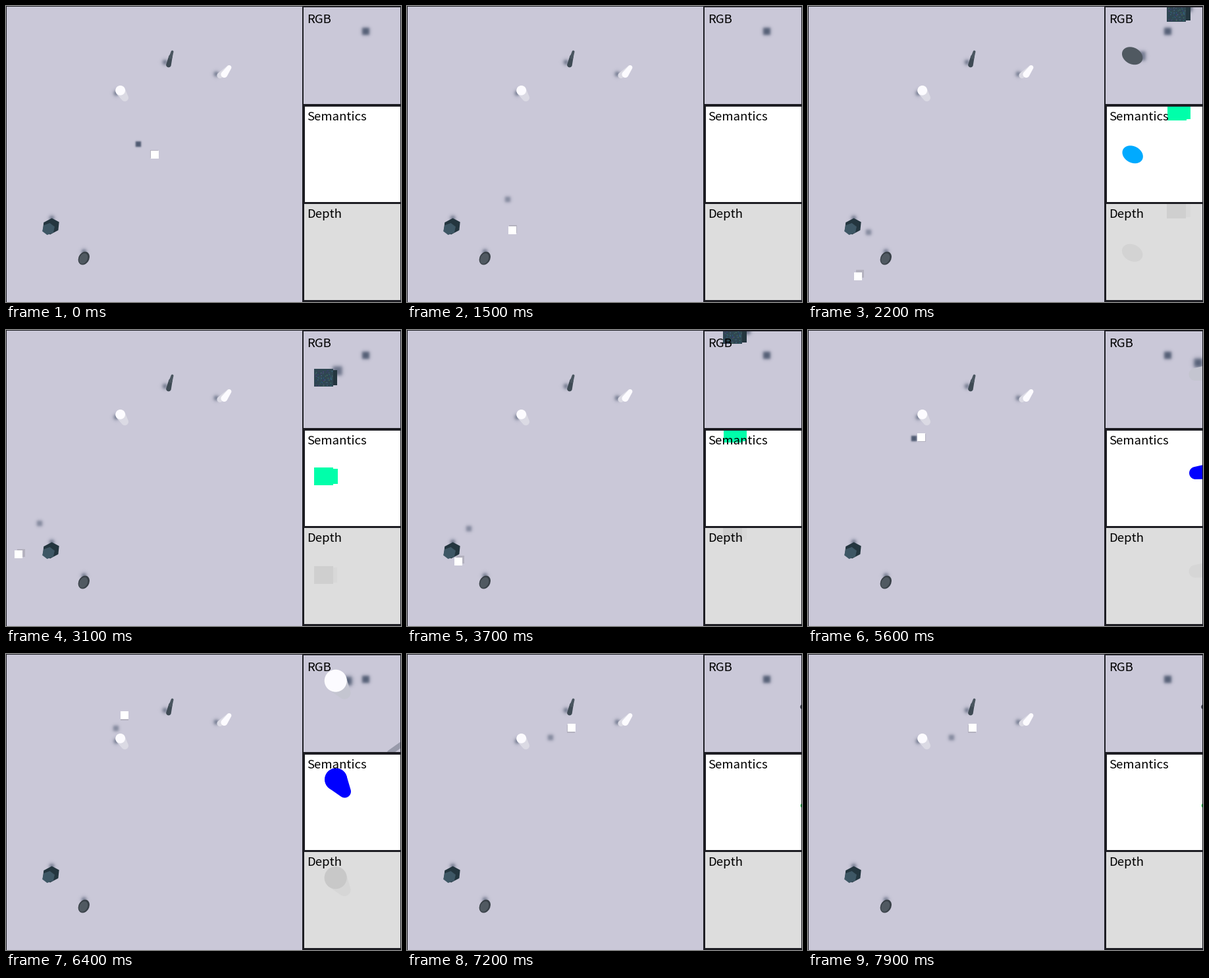
These frames come from a looping animation (600 by 450 pixels, 8000 ms). A matplotlib script:

```python
import numpy as np
import matplotlib.pyplot as plt
from matplotlib.animation import FuncAnimation
from matplotlib.patches import Circle, Ellipse, Polygon, Rectangle

W, H, DPI = 600, 450, 100
FRAMES, INTERVAL, HOLD = 80, 100, 8

# The drone jumps to the next waypoint after every HOLD frames
WAYPOINTS = [(225.5, 225.5), (160, 341), (76, 411), (19, 341), (78, 352),
             (85.5, 305), (128, 238), (171.5, 163), (179.5, 92.5),
             (249.5, 111.5)]
MID = 225            # map centre, below the overhead camera
GROUND = .725        # ground scale relative to the drone's flying height
ZOOM = 1.45          # drone camera scale
VIEW = np.array([525.5, 75])


def rgb(*c):
    return tuple(v / 255 for v in c)


def gray(v):
    return rgb(v, v, v)


FLOOR, FRAME, SHADE = rgb(202, 200, 216), rgb(29, 29, 35), rgb(72, 84, 108)
TEAL, TEAL_DARK = rgb(62, 87, 101), rgb(36, 54, 63)
SLATE, SLATE_DARK = rgb(80, 89, 97), rgb(56, 64, 71)
PALE, WHITE = rgb(219, 218, 228), rgb(252, 251, 255)

fig = plt.figure(figsize=(W / DPI, H / DPI), dpi=DPI, facecolor=FRAME)
ax = fig.add_axes([0, 0, 1, 1])
ax.set_xlim(0, W)
ax.set_ylim(H, 0)
ax.axis("off")


def add(patch, clip=None, z=2):
    patch.set(zorder=z, linewidth=0)
    ax.add_patch(patch)
    if clip is not None:
        patch.set_clip_path(clip)
    return patch


def rect(x0, y0, x1, y1, color, **kw):
    return add(Rectangle((x0, y0), x1 - x0, y1 - y0, fc=color), **kw)


def box(p, rx, ry, color, **kw):
    return rect(p[0] - rx, p[1] - ry, p[0] + rx, p[1] + ry, color, **kw)


def disc(p, r, color, **kw):
    return add(Circle(p, r, fc=color), **kw)


def oval(p, w, h, angle, color, **kw):
    return add(Ellipse(p, w, h, angle=angle, fc=color), **kw)


def gem(p, rx, ry, tilt, sides, color, **kw):
    t = 2 * np.pi * np.arange(sides) / sides
    c, s = np.cos(np.radians(tilt)), np.sin(np.radians(tilt))
    pts = np.c_[rx * np.cos(t), ry * np.sin(t)] @ [[c, s], [-s, c]]
    return add(Polygon(pts + p, fc=color), **kw)


def capsule(p, r, q, s, color, **kw):
    """Hull of two circles."""
    p, q = np.array(p, float), np.array(q, float)
    d = q - p
    th, al = np.arctan2(d[1], d[0]), np.arccos((r - s) / np.hypot(*d))

    def arc(c, rad, a, b):
        t = np.linspace(a, b, 30)
        return c + rad * np.c_[np.cos(t), np.sin(t)]

    pts = np.r_[arc(p, r, th + al, th + 2 * np.pi - al),
                arc(q, s, th - al, th + al)]
    return add(Polygon(pts, fc=color), **kw)


def soft(p, r, blur, alpha, clip=None, z=1.5):
    """Blurred square shadow."""
    pad = r + 3 * blur
    u = np.linspace(-pad, pad, 60)
    edge = (np.tanh((u + r) / blur) - np.tanh((u - r) / blur)) / 2
    img = np.empty((60, 60, 4))
    img[..., :3] = SHADE
    img[..., 3] = alpha * np.outer(edge, edge)
    im = ax.imshow(img, extent=(p[0] - pad, p[0] + pad, p[1] + pad, p[1] - pad),
                   aspect="auto", interpolation="bilinear", zorder=z)
    if clip is not None:
        im.set_clip_path(clip)
    return im


def draw_layout():
    ground = rect(1, 1, 450, 450, FLOOR, z=0)
    cam = rect(452, 1.5, 599, 148.5, FLOOR, z=0)
    sem = rect(453.5, 152.5, 598.5, 297.5, "white", z=0)
    dep = rect(453, 301, 599, 447, gray(221), z=0)
    for y, label in ((26, "RGB"), (174.5, "Semantics"), (322, "Depth")):
        ax.text(457, y, label, family="Noto Sans CJK JP", size=13.4,
                color="black", va="baseline", zorder=9)
    soft((546, 38.5), 5.5, 2.6, .95, clip=cam, z=1)
    return ground, cam, sem, dep


def draw_scene():
    shadows = (69, 323), (118, 374), (167.5, 132.5), (319, 104), (241.5, 85.5)
    for p in shadows:
        soft(p, 3.2, 3, .9)
    # box
    gem((68.3, 335), 14, 12, -28, 6, TEAL_DARK)
    gem((64.5, 339), 10, 9, -20, 6, TEAL)
    # stone
    oval((118.3, 383.5), 16, 21, 28, SLATE_DARK)
    oval((117.6, 384), 12, 17, 28, SLATE)
    # cylinder
    capsule((174, 129), 7.5, (180.5, 139.5), 5.5, PALE)
    disc((173.7, 128.3), 7.4, WHITE)
    # crescent
    capsule((338.5, 93.5), 3.5, (325, 105.5), 4.5, PALE)
    capsule((339, 93.5), 3.4, (331.5, 104), 5, WHITE)
    # spike
    capsule((247, 89.5), 3.8, (250, 77), 2.8, rgb(62, 74, 84))
    capsule((250, 78), 2.6, (252.6, 69.5), 1.9, rgb(74, 86, 96))


def draw_drone(pos):
    off = np.array(pos) - MID
    # the shadow softens away from the centre
    near = np.clip(1.95 - np.hypot(*off) / 85, .6, .95)
    yield soft(MID + GROUND * off + (-25.2, -15.1), 4, 4.8 - 3.8 * near, near,
               clip=ground)
    yield box(MID + .98 * off, 6, 6, rgb(180, 178, 191), clip=ground, z=4)
    yield box(MID + off, 6, 6, "white", clip=ground, z=4)


def draw_view(pos):
    """The drone's cameras: the ground below it, turned by 90 degrees."""
    gx, gy = MID + GROUND * (np.array(pos) - MID)
    # clip area, offset, and whether the view shows shadows
    panels = ((cam, (0, 0)), (sem, (.5, 150)), (dep, (0, 299.5)))

    def see(px, py, zoom=ZOOM):
        return VIEW + zoom * np.array([gy - py, px - gx])

    def visible(p, pad):
        return abs(p - VIEW).max() < 73 + pad

    block = see(74.3, 335.1, 1.52)
    if visible(block, 45):
        yield soft(see(66.7, 324.5), 7, 3, .75, clip=cam)
        green = rgb(0, 255, 170)
        tones = (TEAL_DARK, rgb(47, 70, 82)), (green, green), (gray(216), gray(207))
        for (clip, shift), (side, face) in zip(panels, tones):
            p = block + shift
            yield box(p + (12, 0), 5.5, 11.5, side, clip=clip)
            yield box(p - (3.5, 0), 14.5, 13.5, face, clip=clip, z=2.1)
        rng = np.random.default_rng(4)
        spots = block + rng.uniform((-17, -12), (10, 12.5), (70, 2))
        dots = ax.scatter(*spots.T, s=1.6, lw=0, zorder=2.2,
                          c=rng.uniform((.15, .2, .3), (.3, .45, .5), (70, 3)))
        dots.set_clip_path(cam)
        yield dots

    stone = see(117.5, 382.5)
    if visible(stone, 20):
        yield soft(see(118, 373), 7, 3, .7, clip=cam)
        tones = SLATE, rgb(0, 170, 255), gray(211)
        for (clip, shift), tone in zip(panels, tones):
            yield oval(stone + shift, 33, 25, 28, tone, clip=clip)

    base = see(181, 136.9)
    if visible(base, 25):
        top = VIEW + 2.15 * (base - VIEW)
        yield soft(see(169, 133.5), 6.5, 3.4, .95, clip=cam)
        blue = rgb(0, 0, 255)
        tones = (rgb(196, 197, 208), WHITE), (blue, blue), (gray(214), gray(200))
        for (clip, shift), (body, cap) in zip(panels, tones):
            yield capsule(base + shift, 9.5, top + shift, 17, body, clip=clip)
            yield disc(top + shift, 17, cap, clip=clip, z=2.1)

    foot, tip = see(246.5, 90.5), see(253, 67)
    if visible(foot, 30):
        yield capsule(see(243.7, 89.3), 4, see(235.4, 77.6), 4,
                      rgb(152, 154, 170), clip=cam, z=1.5)
        tones = rgb(58, 62, 74), rgb(30, 200, 70)
        for (clip, shift), tone in zip(panels, tones):
            yield capsule(foot + shift, 4, tip + shift, 3, tone, clip=clip)


ground, cam, sem, dep = draw_layout()
draw_scene()
groups = [[*draw_drone(p), *draw_view(p)] for p in WAYPOINTS]


def update(i):
    for k, group in enumerate(groups):
        for artist in group:
            artist.set_visible(k == i // HOLD)
    return []


anim = FuncAnimation(fig, update, frames=FRAMES, interval=INTERVAL,
                     repeat=True, repeat_delay=0, blit=False)
plt.show()
```
